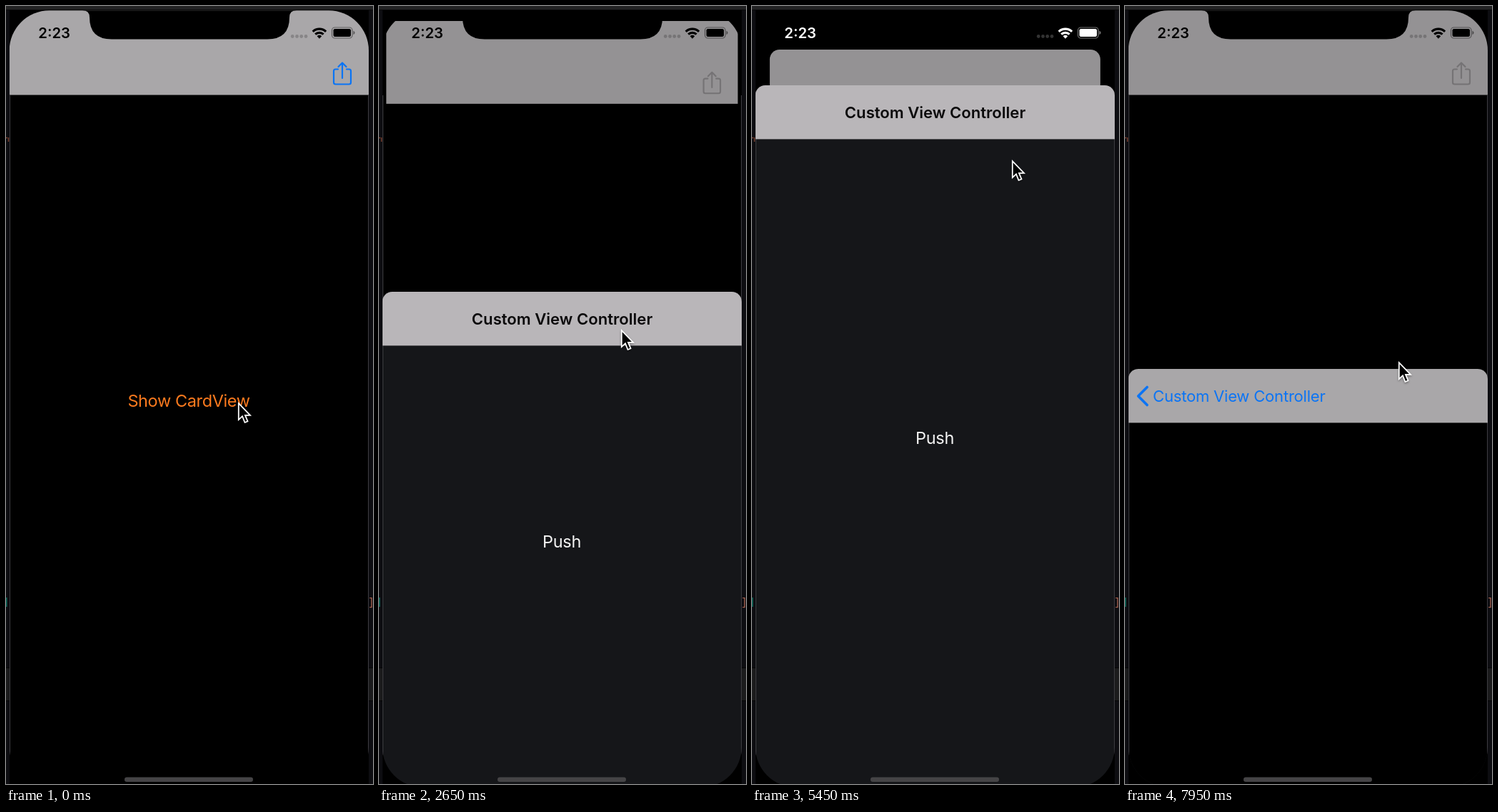
An HTML page that plays this animation: 514x1089 px, repeating every 8 s.

```html
<!DOCTYPE html>
<html lang="en">
<head>
<meta charset="utf-8">
<title>Card view</title>
<style>
  html, body { margin: 0; width: 100%; height: 100%; overflow: hidden; background: #000; }
  svg { display: block; width: 100vw; height: 100vh; }
  text { font-family: Inter, "Liberation Sans", sans-serif; font-size: 22.1px; letter-spacing: -.24px; }
  .big { font-size: 23.5px; }
  .bold { font-weight: 600; letter-spacing: 0; }
  .mid { text-anchor: middle; }
  .code { font: 16px "Noto Sans Mono", monospace; }
</style>
</head>
<body>
<svg viewBox="0 0 514 1089" preserveAspectRatio="none">
  <defs>
    <clipPath id="screen"><rect x="4.700" y="6.300" width="503.300" height="1087" rx="56"/></clipPath>
    <clipPath id="sheet"><rect x="4.700" width="503.300" height="1200" rx="14"/></clipPath>
    <clipPath id="backClip"><rect id="backShape" x="4.700" y="6" width="503.300" height="1087"/></clipPath>
    <filter id="soft" x="-50%" y="-50%" width="200%" height="200%">
      <feDropShadow dx="0" dy="1.5" stdDeviation="1.5" flood-opacity=".4"/>
    </filter>
  </defs>

  <!-- window behind the phone -->
  <rect width="514" height="1089" fill="#0d0d11"/>
  <rect y="926" width="514" height="46" fill="#1b1b1c"/>
  <path d="M0 926.5H514M0 972.5H514" stroke="#050505"/>
  <path d="M0 184.5h2M3.500 184v6" stroke="#7a4030" stroke-width="1.500"/>
  <rect y="828" width="1.500" height="13" fill="#0d6b5c"/>
  <text class="code" x="507" y="840" fill="#a5604e">]</text>
  <rect x="5" width="503" height="1089"/>
  <rect width="514" height="5" fill="#232324"/>
  <rect y="5" width="514" height="1" fill="#0a0a0a"/>

  <g clip-path="url(#screen)">
    <g id="back">
      <g clip-path="url(#backClip)">
        <rect x="4" y="6" width="505" height="1087"/>
        <rect id="bar" x="4" y="6" width="505" height="118.500"/>
        <g id="share" fill="none" stroke-width="2.200" stroke-linecap="round" stroke-linejoin="round">
          <path d="M465 88.500h-3.500q-2.500 0-2.500 2.500v16q0 2.500 2.500 2.500h19q2.500 0 2.500-2.500v-16q0-2.500-2.500-2.500h-3.500"/>
          <path d="M471 101V79.500M465.500 85l5.500-5.500 5.500 5.500"/>
        </g>
        <text class="big mid" x="256" y="560.500" fill="#fc7a1e" style="letter-spacing:-.38px">Show CardView</text>
      </g>
    </g>
    <path d="M5.500 125V1089M507.500 125V1089" stroke="#3d3c41"/>

    <path d="M107 6Q117 6 117 16Q117 46.500 148 46.500H366Q397 46.500 397 16Q397 6 407 6Z"/>

    <g id="status">
      <text class="bold" x="45.300" y="45" style="font-size:20.300px">2:23</text>
      <g opacity=".2">
        <circle cx="401.200" cy="42.500" r="2.400"/><circle cx="407.500" cy="42.500" r="2.400"/>
        <circle cx="413.700" cy="42.500" r="2.400"/><circle cx="420" cy="42.500" r="2.400"/>
      </g>
      <g fill="none" stroke="currentColor" stroke-width="3.200">
        <path d="M429.700 35.800a13.300 13.300 0 0 1 18.400 0M433.200 39.700a8.300 8.300 0 0 1 11.400 0"/>
      </g>
      <path d="M438.900 45.700l-3.300-3.500a4.700 4.700 0 0 1 6.600 0z"/>
      <rect x="456.500" y="30" width="28.500" height="15" rx="4" fill="none" stroke="currentColor" stroke-width="1.200" opacity=".45"/>
      <rect x="458.500" y="32" width="24.500" height="11" rx="2.200"/>
      <path d="M486.500 34.800q2 .8 2 2.700t-2 2.700z" opacity=".5"/>
    </g>

    <g id="card">
      <g clip-path="url(#sheet)">
        <rect x="4" width="505" height="1200" fill="#151619"/>
        <text id="push" class="big mid" fill="#f4f4f4">Push</text>
        <rect id="page" x="4" width="505" height="1200"/>
        <path d="M5.500 75V1200M507.500 75V1200" stroke="#3d3c41"/>
        <rect id="cardBar" x="4" width="505" height="75.400"/>
        <text id="title" class="bold mid" x="256.500" y="46" fill="#0b0a0b">Custom View Controller</text>
        <g id="backItem" fill="#0b74f5">
          <path d="M31 25.500L18.500 38L31 50.500" fill="none" stroke="#0b74f5" stroke-width="3.600" stroke-linecap="round" stroke-linejoin="round"/>
          <text id="backText" x="39" y="46">Custom View Controller</text>
        </g>
      </g>
    </g>
    <rect x="166" y="1079.500" width="180" height="6.500" rx="3.200" fill="#454446"/>
  </g>

  <g id="cursor" filter="url(#soft)">
    <path d="M.8 1.200V24L6 19.200L9.500 28L13.500 26.400L9.900 17.800H17Z" fill="#050505" stroke="#fff" stroke-width="1.700"/>
  </g>
</svg>
<script>
  const LOOP = 8000, STEP = 50, LOW = 508, HIGH = 111, OFF = 1093;
  const $ = id => document.getElementById(id);
  const clamp = v => Math.min(1, Math.max(0, v));
  const mix = (a, b, k) => a + (b - a) * k;
  const rgb = (a, b, k) => `rgb(${a.map((v, i) => Math.round(mix(v, b[i], k)))})`;
  const ramp = (t, from, to) => clamp((t - from) / (to - from));
  const spring = (ms, tau) => (1 + ms / tau) * Math.exp(-ms / tau);
  const inOut = u => u < .5 ? 4 * u ** 3 : 1 - 4 * (1 - u) ** 3;
  const speedUp = u => u ** 1.4;

  // time, x, y, easing towards this point
  const path = [
    [0, 325, 555], [1100, 325, 555], [1950, 339, 561], [2150, 339, 561],
    [2650, 339, 453], [3350, 339, 569], [3550, 339, 569], [4250, 382, 59],
    [4350, 382, 59], [4850, 364, 201], [5150, 364, 201], [5450, 364, 216],
    [5850, 358, 516, speedUp], [6050, 358, 516], [6550, 262, 800],
    [7550, 262, 800], [7950, 383, 498]
  ];

  function pointer(t) {
    const i = path.findIndex(p => p[0] > t);
    if (i < 0) return path[path.length - 1].slice(1, 3);
    const a = path[i - 1], b = path[i];
    const k = (b[3] || inOut)(ramp(t, a[0], b[0]));
    return [mix(a[1], b[1], k), mix(a[2], b[2], k)];
  }

  function cardTop(t, y) {
    if (t < 250) return OFF;
    if (t < 2150) return LOW + (OFF - LOW) * spring(t - 250, 70);
    if (t < 3450) return Math.min(LOW, y - 53);
    if (t <= 4250) {
      const top = y - 61;
      return top < HIGH ? HIGH - (HIGH - top) * .103 : top;
    }
    if (t < 5450) return HIGH - 12 * spring(t - 4250, 60);
    if (t < 5850) return y - 105;
    return LOW - 97 * Math.exp((5850 - t) / 80);
  }

  function draw(t) {
    const [x, y] = pointer(t);
    const top = cardTop(t, y);
    const lift = Math.max(0, (LOW - top) / (LOW - HIGH));
    const dim = clamp((OFF - top) / (OFF - LOW));
    const pushed = 1 - (1 - ramp(t, 6750, 7300)) ** 3;
    const light = ramp(t, 3900, 4150) - ramp(t, 5850, 6180);
    const ink = rgb([0, 0, 0], [255, 255, 255], light);
    const move = (id, dx, dy) => $(id).setAttribute("transform", `translate(${dx} ${dy})`);
    const fill = (id, c) => $(id).setAttribute("fill", c);

    const s = 1 - .08 * lift;
    $("back").setAttribute("transform",
      `translate(256.4 ${6 + 55 * lift}) scale(${s}) translate(-256.4 -6)`);
    $("backShape").setAttribute("rx", 15 * Math.min(1, lift));
    fill("bar", rgb([169, 167, 169], [148, 146, 148], dim));
    $("share").setAttribute("stroke", rgb([10, 116, 245], [117, 115, 117], dim));

    fill("status", ink);
    $("status").style.color = ink;

    move("card", 0, top);
    move("push", 256 - 150 * pushed, 557.5 - top / 2);
    move("page", 503 * (1 - pushed), 0);
    fill("cardBar", rgb([185, 182, 185], [169, 167, 169], pushed));
    move("title", -96 * pushed, 0);
    $("title").setAttribute("opacity", 1 - pushed);
    $("backItem").setAttribute("opacity", pushed);
    move("backText", 96 * (1 - pushed), 0);
    move("cursor", x, y);
  }

  const start = performance.now();
  function tick(now) {
    const t = Math.max(0, now - start) % LOOP;
    draw(Math.floor(t / STEP) * STEP);
    requestAnimationFrame(tick);
  }
  draw(0);
  requestAnimationFrame(tick);
</script>
</body>
</html>
```
